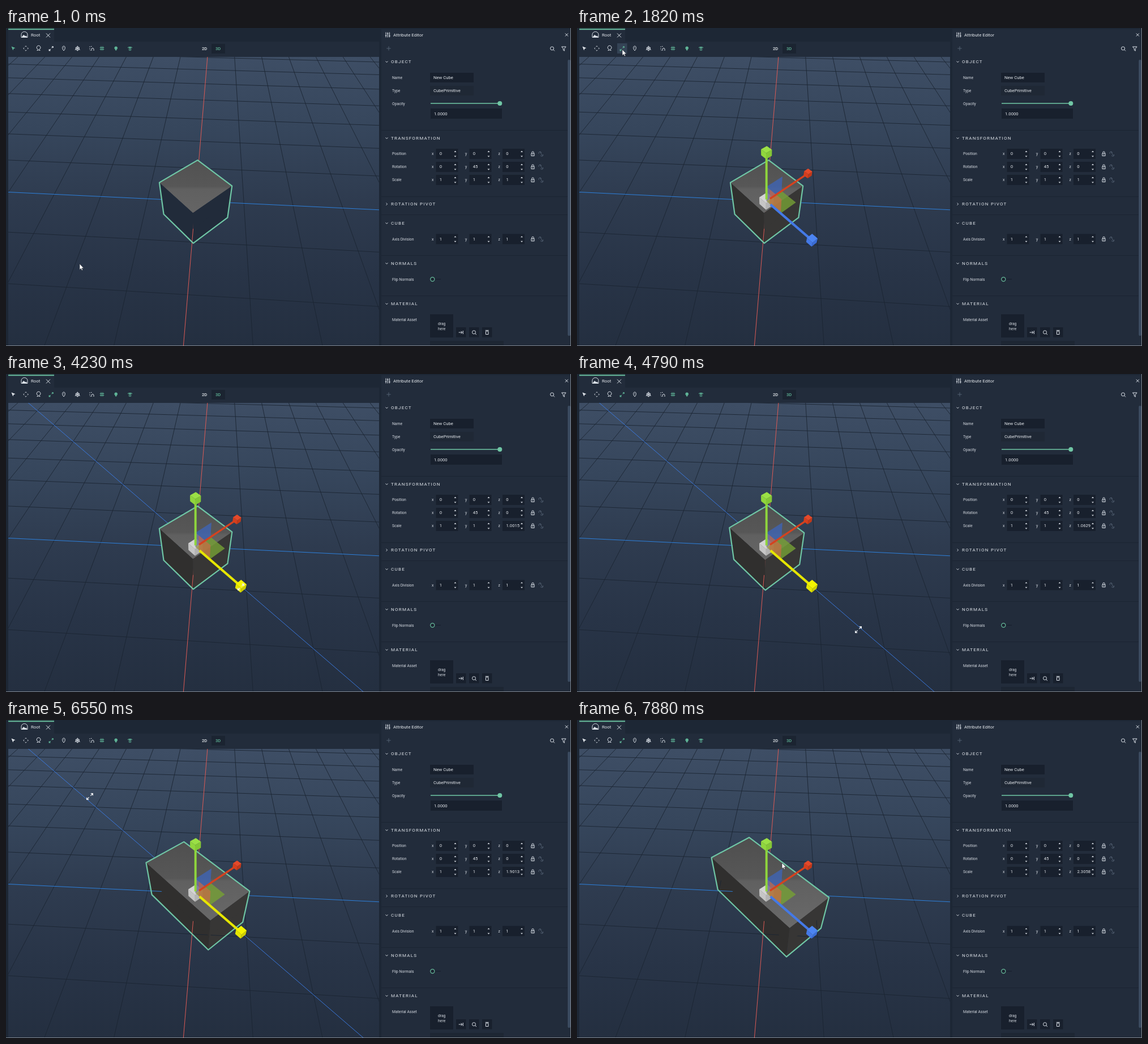
Recreate the animation shown at these times as an HTML page. Size 998 px wide and 561 px high, loop 8000 ms.

```html
<!DOCTYPE html>
<html lang="en">
<head>
<meta charset="utf-8">
<title>Scale tool</title>
<style>
  html, body { margin: 0; width: 100%; height: 100%; overflow: hidden; background: #222c3b; }
  svg { display: block; width: 998px; height: 561px; }
  text { font-family: Roboto, "Open Sans", sans-serif; font-size: 7.7px; fill: #e4e8ed; white-space: pre; }
  .label { font-size: 6.8px; fill: #d5dae1; }
  .title { font-size: 8px; letter-spacing: 1.25px; fill: #dfe4ea; }
  .head { font-size: 7.9px; }
  .mid { text-anchor: middle; }
  .box { fill: #18202d; }
  .icon { fill: none; stroke: #dce2e9; stroke-width: 1; }
  .green { stroke: #5fb497; }
  .dim { stroke: #536072; }
</style>
</head>
<body>
<svg viewBox="0 0 998 561" xmlns="http://www.w3.org/2000/svg">
  <defs>
    <linearGradient id="sky" x1="0" y1="0" x2="0" y2="1">
      <stop offset="0" stop-color="#3e4e65"/>
      <stop offset=".25" stop-color="#36465c"/>
      <stop offset=".5" stop-color="#2e3b4f"/>
      <stop offset=".75" stop-color="#283447"/>
      <stop offset="1" stop-color="#242f40"/>
    </linearGradient>
    <linearGradient id="lid" gradientUnits="userSpaceOnUse" x1="0" y1="205" x2="0" y2="370">
      <stop offset="0" stop-color="#4e4e4e"/>
      <stop offset=".45" stop-color="#575757"/>
      <stop offset=".48" stop-color="#606060"/>
      <stop offset="1" stop-color="#6a6a6a"/>
    </linearGradient>
    <clipPath id="view"><rect x="4" y="51" width="655" height="510"/></clipPath>
    <clipPath id="zField"><rect x="877" y="258" width="30" height="20"/></clipPath>
    <path id="stretch" d="M1.4-1.4 5.3-5.3M1.8-5.3H5.3V-1.8M-1.4 1.4-5.3 5.3M-1.8 5.3H-5.3V1.8"/>
    <path id="lock" d="M-2.6-.8H2.6V3.6H-2.6ZM-1.7-.8V-2.4A1.7 1.7 0 0 1 1.7-2.4V-.8M0 .8V2"/>
    <path id="link" d="M-3.5 0A2.2 2.2 0 0 1 0-3L1-2M3.5 1A2.2 2.2 0 0 1 0 3.6L-1 2.8M-2-4 3 4"/>
    <g id="lens"><circle cx="-.5" cy="-.5" r="3"/><path d="M1.7 1.7 4 4"/></g>
  </defs>

  <rect width="998" height="561" fill="#222c3b"/>
  <path d="M0 0H998V2H0ZM0 0H4V561H0ZM659 0H663V561H659ZM85 2H659V24H85Z" fill="#1d2735"/>
  <path d="M4 2.300H85" stroke="#6abf9e" stroke-width="2"/>

  <g clip-path="url(#view)">
    <rect x="4" y="51" width="655" height="510" fill="url(#sky)"/>
    <g id="scene"></g>
  </g>
  <g id="ui"></g>
  <path d="M0 560.600H997.600V0" fill="none" stroke="#a4a9b0" stroke-width=".8"/>

  <rect id="hover" x="71" y="27" width="17.500" height="18" fill="#344355"/>
  <path id="pick" d="M9.500 32.500 16.500 35.200 13.500 36.500 12.300 39.600Z"/>
  <use id="scaleIcon" href="#stretch" transform="translate(79.700 36.300) scale(.68)" fill="none" stroke-width="1.600"/>
  <text id="zValue" x="883.500" y="270.200" clip-path="url(#zField)">1</text>

  <path id="arrow" d="M0 0V10.400L2.400 8.300 4 11.800 5.600 11.100 4.100 7.700H7.300Z" fill="#fff" stroke="#1a212c" stroke-width=".6"/>
  <use id="drag" href="#stretch" fill="none" stroke="#f2f4f7" stroke-width="1.300"/>
</svg>

<script>
const $ = id => document.getElementById(id);

// ---- interface ----
const text = (x, y, s, cls = '') => `<text class="${cls}" x="${x}" y="${y + 2.2}">${s}</text>`;
const box = (x, y, w, h, extra = 'class="box"') => `<rect x="${x}" y="${y}" width="${w}" height="${h}" ${extra}/>`;
const icon = (x, y, d, cls = '') => `<path class="icon ${cls}" transform="translate(${x} ${y})" d="${d}"/>`;
const use = (x, y, id, cls = '') => `<use class="icon ${cls}" href="#${id}" x="${x}" y="${y}"/>`;
const fill = (d, color) => `<path d="${d}" fill="${color}"/>`;

function section(y, name, open = true) {
  const d = open ? 'M-2-1 0 1 2-1' : 'M-1-2 1 0-1 2';
  return icon(672.5, y - .4, d) + text(680, y + .1, name, 'title');
}

function vectorRow(y, name, values) {
  let out = text(682, y, name, 'label');
  values.forEach((v, i) => {
    const x = [759.5, 818.5, 877][i];
    out += text(x - 7.5, y, 'xyz'[i], 'label') + box(x, y - 9, 39, 18) + text(x + 6.3, y, v);
    out += fill(`M${x + 32} ${y - 3}h4l-2-2.400zM${x + 32} ${y + 3.4}h4l-2 2.400z`, '#d5dae1');
  });
  return out + use(930.5, y, 'lock') + use(945, y, 'link', 'dim');
}

function buildUi() {
  const parts = [
    // tab and toolbar
    icon(32.5, 12, 'M-5.500 4.500V-.5A5.500 5 0 0 1 5.500-.5V4.500Z'),
    fill('M27.500 16.300 31 12 34.500 14.500 35.500 13.500 37.500 16.300Z', '#dce2e9'),
    text(44, 12.3, 'Root', 'head'),
    icon(74.5, 13, 'M-3.500-3.500 3.500 3.500M3.500-3.500-3.500 3.500'),
    icon(35, 36, 'M-1.300-3 0-4.300 1.300-3M-1.300 3 0 4.300 1.300 3M-3-1.300-4.300 0-3 1.300M3-1.300 4.300 0 3 1.300'),
    icon(57.5, 36, 'M-3 3.500H-.8V1.800A3.400 3.400 0 1 1 1 1.800V3.500H3'),
    icon(102, 36, 'M0 4C-4-.5-2.500-4 0-4S4-.5 0 4ZM-.7-1.200H.7'),
    icon(126.3, 36, 'M0-4.500V4.500M-4.500 2.500 0 0 4.500 2.500M-3-1.500 0-3 3-1.500V2L0 3.500-3 2ZM-3-1.500 0 0 3-1.500'),
    icon(151.5, 36, 'M-3.500-3.500V-2M-3.500 0V1.500M-1.500-3.500H0M-.5 4V1.500A2 2 0 0 1 3.500 1.500V4M-3 3.500H-2'),
    icon(169.5, 36, 'M-1.500-3.800V3.800M1.500-3.800V3.800M-3.800-1.500H3.800M-3.800 1.500H3.800', 'green'),
    fill('M193 39.500V37.800A2.800 2.800 0 1 1 195.400 37.800V39.500Z', '#5fb497'),
    icon(219, 36, 'M-3.800-1.500A4.500 2.300 0 0 1 3.800-1.500 4.500 2.300 0 0 1-3.800-1.500M-2 2.300A2 1.200 0 0 1 2 2.300 2 1.200 0 0 1-2 2.300M-1-1.500H1', 'green'),
    box(363, 28, 24, 17, 'fill="#1b2431"'),
    '<text class="mid" x="350.700" y="38.700" font-size="7.200" font-weight="500">2D</text>',
    '<text class="mid" x="374.700" y="38.700" font-size="7.200" font-weight="500" style="fill:#5fb497">3D</text>',
    // panel head
    icon(674.3, 12, 'M-3.200-4.500V4.500M0-4.500V4.500M3.200-4.500V4.500M-4.500 1.500H-1.900M-1.300-2H1.300M1.900 2H4.500'),
    text(684, 12.4, 'Attribute Editor', 'head'),
    icon(990.3, 12, 'M-2.500-2.500 2.500 2.500M2.500-2.500-2.500 2.500'),
    icon(676, 36, 'M-3.700 0H3.700M0-3.700V3.700', 'dim'),
    use(965, 36.5, 'lens'),
    icon(985.3, 36.5, 'M-3.800-3.500H3.800L1 0V3.800L-1 2.500V0Z'),
    box(992.3, 56, 4.7, 487, 'rx="2" fill="#3c4c61"'),
    ...[180, 297, 329, 401, 472].map(y => box(663, y, 329, 1, 'fill="#1b2432"')),
    // object
    section(60, 'OBJECT'),
    text(682, 87.3, 'Name', 'label'), box(749, 79, 77, 17), text(755, 87.5, 'New Cube'),
    text(682, 110.3, 'Type', 'label'), box(749, 102, 77, 17, 'fill="#1f2835"'), text(755, 110.5, 'CubePrimitive'),
    text(682, 133.3, 'Opacity', 'label'),
    box(750, 132.2, 122, 1.6, 'fill="#6abf9e"'), '<circle cx="872.300" cy="133" r="4" fill="#70c7a5"/>',
    box(750, 142, 126, 18), text(756, 151.4, '1.0000'),
    // transformation
    section(194.7, 'TRANSFORMATION'),
    vectorRow(222, 'Position', [0, 0, 0]),
    vectorRow(245, 'Rotation', [0, 45, 0]),
    vectorRow(268, 'Scale', [1, 1, '']),
    section(311, 'ROTATION PIVOT', false),
    section(344.8, 'CUBE'),
    vectorRow(372.3, 'Axis Division', [1, 1, 1]),
    section(415.7, 'NORMALS'),
    text(682, 443.4, 'Flip Normals', 'label'),
    box(757, 442.6, 11, 1.2, 'fill="#18202d"'),
    '<circle cx="753.300" cy="443.200" r="3.600" fill="#1b2431" stroke="#6abf9e" stroke-width="1.200"/>',
    // material
    section(487, 'MATERIAL'),
    text(682, 514.6, 'Material Asset', 'label'),
    box(749, 505, 41, 41), text(769.7, 521.5, 'drag', 'label mid'), text(769.7, 530.7, 'here', 'label mid'),
    ...[795, 818, 841].map(x => box(x, 528, 17.5, 17.5)),
    icon(803.7, 537, 'M-4 0H2M0-2.300 2.300 0 0 2.300M3.600-3V3'),
    use(827, 537.2, 'lens'),
    icon(849.7, 537, 'M-2.300-2V3.500H2.300V-2ZM-3-3.600H3'),
    box(749, 552, 130, 9, 'fill="#1d2633"')
  ];
  $('ui').innerHTML = parts.join('');
}

// ---- 3D view ----
const FOCAL = 500, DIST = 11.75, SIN = .757, COS = .653, TURN = .063;

// side: to the right, h: up, away: into the picture
function project(side, h, away) {
  const w = DIST + away * COS - h * SIN;
  return [334.7 + FOCAL * side / w, 305.3 - FOCAL * (away * SIN + h * COS) / w];
}
const world = (i, j) => project(.998 * i + TURN * j, 0, .998 * j - TURN * i);
const local = (x, y, z) => project(.751 * x + .66 * z, y, .66 * x - .751 * z);

const path = pts => 'M' + pts.map(p => p.map(n => n.toFixed(1)).join(' ')).join('L');
const line = (a, b, color, width = 1) => `<path d="${path([a, b])}" stroke="${color}" stroke-width="${width}"/>`;
const poly = (pts, color, more = '') => `<path d="${path(pts)}Z" fill="${color}" ${more}/>`;

function makeGround() {
  let d = '';
  for (let k = -30; k <= 30; k += 2) {
    if (!k) continue;
    d += path([world(k, -8), world(k, 28)]);
    if (k >= -8) d += path([world(-32, k), world(32, k)]);
  }
  return `<path d="${d}" fill="none" stroke="#1b2533" stroke-width=".9"/>` +
    line(world(0, -8), world(0, 28), '#dc5a55') +
    line(world(-30, 0), world(30, 0), '#2d80dc');
}

// The three faces of a box that the camera sees, from height lo to hi.
function solid([cx, cy, cz], [hx, lo, hi, hz], [top, left, right]) {
  const v = (x, y, z) => local(cx + x * hx, cy + y, cz + z * hz);
  return poly([v(-1, hi, -1), v(-1, hi, 1), v(-1, lo, 1), v(-1, lo, -1)], left) +
    poly([v(-1, hi, 1), v(1, hi, 1), v(1, lo, 1), v(-1, lo, 1)], right) +
    poly([v(-1, hi, -1), v(1, hi, -1), v(1, hi, 1), v(-1, hi, 1)], top);
}
const knob = (c, h, colors) => solid(c, [h, -h, h, h], colors);

function gizmo(active) {
  const p = .86, q = .2, o = local(0, 0, 0);
  const px = local(p, 0, 0), py = local(0, p, 0), pz = local(0, 0, p), pyz = local(0, p, p);
  const blue = active ? ['#f4f400', '#e6e600', '#cfcf00'] : ['#4c84f2', '#4479e6', '#3a6cd6'];
  return knob([0, 0, 0], .21, ['#d4d4d4', '#c6c6c6', '#b4b4b4']) +
    poly([o, py, local(p, p, 0), px], '#3f64b4', 'opacity=".8"') +
    poly([o, px, local(p, 0, p), pz], '#76a035', 'opacity=".8"') +
    poly([o, py, pyz, pz], '#d9807a', 'opacity=".3"') +
    poly([local(0, 0, q), local(0, p, q), pyz, pz], '#c8653a', 'opacity=".55"') +
    line(local(q, 0, 0), local(2.4, 0, 0), '#d5421f', 3.3) +
    line(local(0, .1, 0), local(0, 2.5, 0), '#8fd53d', 4) +
    line(local(0, 0, .25), local(0, 0, 2.45), blue[1], 4.2) +
    knob([2.5, 0, 0], .13, ['#e5492a', '#d63e1d', '#c23818']) +
    knob([0, 2.57, 0], .133, ['#9be045', '#90d63d', '#84c736']) +
    knob([0, 0, 2.55], .138, blue);
}

function drawScene(s, armed, active) {
  const colors = armed ? ['url(#lid)', '#302f2e', '#373635'] : ['url(#lid)', '#212b3a', '#212b3a'];
  const rim = [[1, 1, -s], [1, 1, s], [1, -1, s], [-1, -1, s], [-1, -1, -s], [-1, 1, -s]];
  return solid([0, 0, 0], [1, -1, 1, s], colors) + ground +
    (active ? line(local(0, 0, -30), local(0, 0, 11), '#3a78dc') : '') +
    solid([0, 0, 0], [1, 0, 1, s], colors) +
    poly(rim.map(v => local(...v)), 'none', 'stroke="#6fc6a5" stroke-width="2.200" stroke-linejoin="round"') +
    (armed ? gizmo(active) : '');
}

// ---- timeline ----
const LOOP = 8000, ARMED = 1660, GRAB = 4080, DROP = 7480;

// The picture only changes at these moments: [first, last, count].
const steps = [[300, 1270, 8], [1400, 1820, 4], [2350, 3260, 8], [3410, 4370, 8], [4490, 5480, 8],
  [5630, 6550, 8], [6680, 7640, 8], [7760, 7880, 2]]
  .flatMap(([a, b, n]) => Array.from({ length: n }, (_, i) => Math.round(a + (b - a) * i / (n - 1))));
const snap = t => steps.reduce((last, s) => s <= t ? s : last, 0);

// [time, x, y]; the pointer wraps from the lower right to the upper left while dragging
const pointer = [[0, 130, 416], [170, 130, 416], [500, 122, 350], [950, 92, 120], [1270, 81, 47], [1400, 80, 40],
  [1820, 80, 38], [2220, 80, 38], [2500, 92, 100], [2950, 145, 350], [3260, 158, 418], [3410, 172, 417],
  [3950, 408, 374], [GRAB, 413, 374], [4773, 497, 451], [5200, 560, 512], [5201, 62, 117], [5630, 146, 178],
  [6240, 560, 518], [6241, 8, 51], [6550, 148, 135], [DROP, 338, 278], [7640, 341, 280], [7880, 362, 252], [LOOP, 362, 252]];
const scaleKeys = [[0, 1], [GRAB, 1], [4773, 1.0629], [5630, 1.2882], [6550, 1.9013], [DROP - 60, 2.3058], [LOOP, 2.3058]];

function at(keys, t) {
  const i = Math.max(1, keys.findIndex(k => k[0] >= t));
  const a = keys[i - 1], b = keys[i], u = (t - a[0]) / (b[0] - a[0]);
  return a.slice(1).map((v, n) => v + (b[n + 1] - v) * u);
}

const ground = makeGround();
const show = (id, on) => $(id).style.display = on ? '' : 'none';
let shown = -1;

function render(t) {
  const now = snap(t);
  if (now === shown) return;
  shown = now;
  const [x, y] = at(pointer, now), [s] = at(scaleKeys, now);
  const armed = now >= ARMED, active = now >= GRAB && now < DROP;
  $('scene').innerHTML = drawScene(s, armed, active);
  $('zValue').textContent = s === 1 ? '1' : s.toFixed(4);
  $('pick').setAttribute('fill', armed ? '#e4e8ed' : '#5fb497');
  $('scaleIcon').setAttribute('stroke', armed ? '#5fb497' : '#dce2e9');
  show('hover', now >= 1400 && now < 2350);
  show('arrow', !active);
  show('drag', active);
  $(active ? 'drag' : 'arrow').setAttribute('transform', `translate(${x.toFixed(1)} ${y.toFixed(1)})`);
}

buildUi();
render(0);
const start = performance.now();
(function tick() {
  render((performance.now() - start) % LOOP);
  requestAnimationFrame(tick);
})();
</script>
</body>
</html>
```
